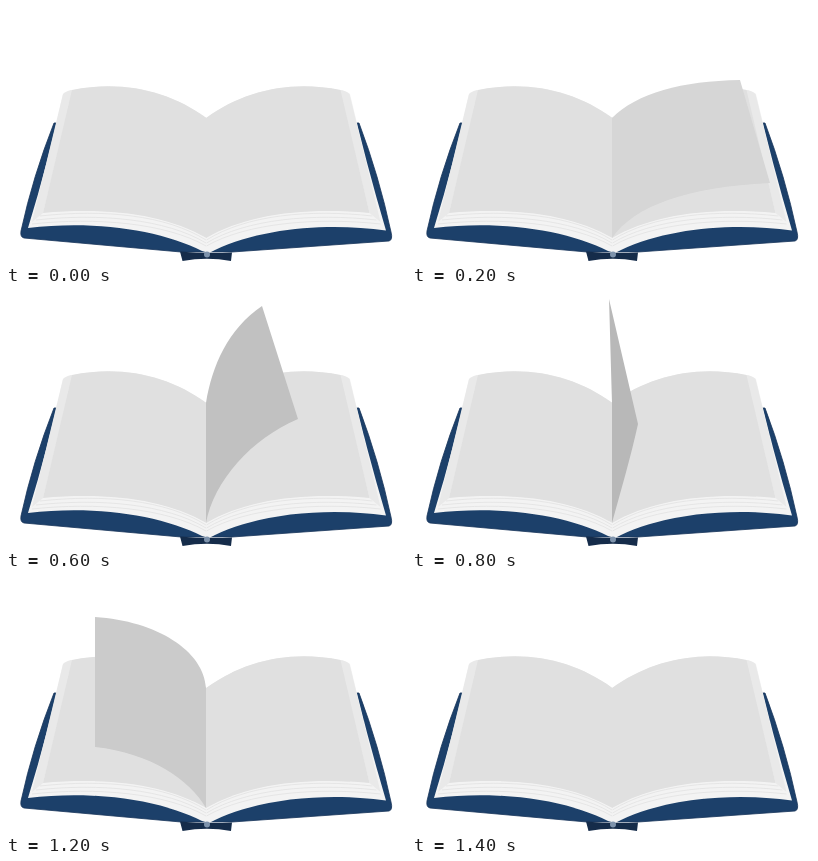
An HTML page that plays this animation: 400x257 px, repeating every 1600 ms.

```html
<!DOCTYPE html>
<html lang="en">
<head>
<meta charset="utf-8">
<title>Turning page</title>
<style>
html, body { margin: 0; width: 100%; height: 100%; overflow: hidden; background: #fff; }
svg { display: block; width: 400px; height: 257px; }
</style>
</head>
<body>
<svg viewBox="0 0 400 257">
  <defs>
    <g id="sheets">
      <path fill="#e9e9e9" d="M57 88Q62 84 67 84L37 207L26 216Z"/>
      <path fill="none" stroke="#e3e3e3" stroke-width=".8" d="M26 218C90 211 160 217 200 240M30 214C94 207 160 213 200 237M34 210C98 203 160 209 200 234"/>
      <path fill="#e0e0e0" d="M66 84C117 74 163 85 200.5 112V232C160 209 105 201 37 207Z"/>
    </g>
  </defs>
  <!-- cover, page block, sheets, spine -->
  <path fill="#1c406a" stroke="#17345a" stroke-width=".8" d="M48 117Q27 170 15 225Q14 231 18 232L175 246H226L383 235Q387 234 385 226Q373 170 353 117Z"/>
  <path fill="#f3f3f3" d="M57 88Q62 84 67 84C117 74 163 85 200.5 112C238 85 284 74 334 84Q339 84 344 88Q360 157 380 224.5C325 217 258 221 209 244L203 247L196 245C155 224 88 214 22 222Q42 157 57 88Z"/>
  <use href="#sheets"/>
  <use href="#sheets" transform="matrix(-1 0 0 1 400.5 0)"/>
  <path fill="#152c4a" d="M174 245.5Q200 248 226 246.5L225 255Q201 250.5 176.5 255Z"/>
  <circle cx="201" cy="248.5" r="3" fill="#7e93ac"/>
  <path id="page"/>
</svg>
<script>
const STEP = 200, LOOP = 1600;
const page = document.getElementById("page");

// Per pose: shade, top edge from the spine outwards, lower corner, bottom edge back to the spine
const poses = [
  null,
  ["#d6d6d6", "225 87 270 75 328 74", "358 177", "275 181 222 200"],
  ["#cbcbcb", "222 78 260 56 307 42", "344 143", "270 147 222 180"],
  ["#c1c1c1", "206 75 222 38 256 15", "292 128", "245 148 208 190"],
  ["#b8b8b8", "199 80 198 40 197 8", "226 133", "219 165 208 203"],
  ["#c0c0c0", "199 80 172 28 131 4", "117 156", "160 175 193 205"],
  ["#cbcbcb", "198 75 151 45 89 41", "89 171", "145 177 184 204"],
  null
];

function draw(now) {
  const pose = poses[Math.floor(now % LOOP / STEP)];
  page.style.display = pose ? "" : "none";
  if (pose) {
    const [shade, top, corner, bottom] = pose;
    page.setAttribute("fill", shade);
    page.setAttribute("d", `M200 112C${top}L${corner}C${bottom} 200 232Z`);
  }
}

let start;
function tick(now) {
  start ??= now;
  draw(now - start);
  requestAnimationFrame(tick);
}
draw(0);
requestAnimationFrame(tick);
</script>
</body>
</html>
```
